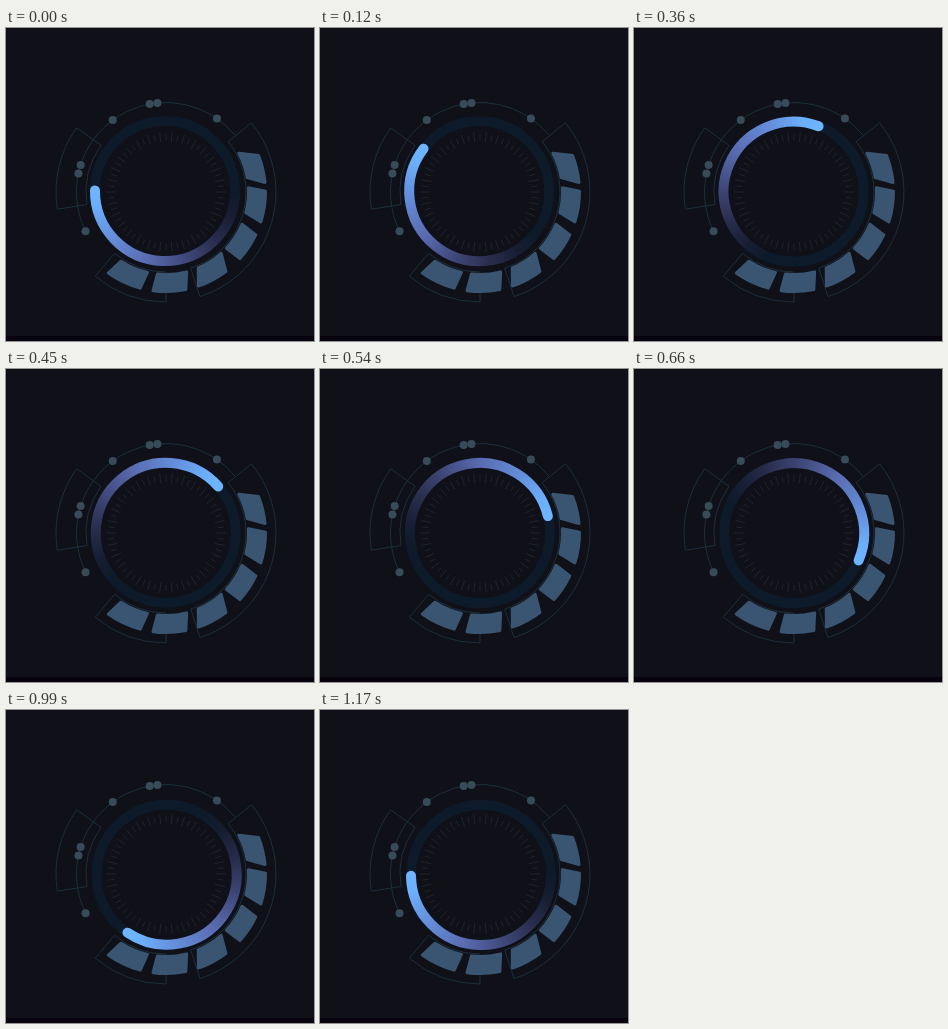
An HTML page with a canvas for the animation above (1230 ms loop, 308 by 313 pixels).

```html
<!DOCTYPE html>
<html>
<head>
<meta charset="utf-8">
<title>Dial loader</title>
<style>
html, body { margin: 0; width: 100%; height: 100%; overflow: hidden; background: #0f1018; }
canvas { display: block; }
</style>
</head>
<body>
<canvas id="stage" width="308" height="313"></canvas>
<script>
const ctx = document.getElementById('stage').getContext('2d');
const CX = 160, CY = 164, LOOP = 1230, STEP = 30, STEPS = 39;
const rad = deg => deg * Math.PI / 180;
const polar = (r, deg) => [CX + r * Math.cos(rad(deg)), CY + r * Math.sin(rad(deg))];

// Start and end angles of the outlined sectors
const sectors = [[-39, 72], [90, 130], [171, 215.7]];
// Inner start/end and outer start/end angles of the solid blocks
const blocks = [
  [-28, -10, -21.5, -5.5], [-3, 14.5, -0.5, 17.5], [23, 43, 25.5, 42],
  [48, 67, 53, 71], [75.5, 96, 78.5, 97.5], [103, 123, 105, 125.5]
];
const dots = [154, 192, 197.5, 233.5, 259.5, 264.5, 304.7];
// Trail colours by degrees behind the head
const trail = [
  [180, '#0d1a29'], [160, '#171e33'], [138, '#272b4a'], [110, '#3d4575'],
  [75, '#5a6cb2'], [40, '#648fdc'], [12, '#6cb0fc'], [0, '#6eb4ff']
];

function sector(r0, r1, [i0, i1, o0 = i0, o1 = i1]) {
  ctx.beginPath();
  ctx.arc(CX, CY, r0, rad(i0), rad(i1));
  ctx.arc(CX, CY, r1, rad(o1), rad(o0), true);
  ctx.closePath();
}

function drawFrame() {
  ctx.fillStyle = '#0f1018';
  ctx.fillRect(0, 0, 308, 313);
  ctx.fillStyle = '#07020d';
  ctx.fillRect(0, 308, 308, 5);

  ctx.lineWidth = 1;
  ctx.strokeStyle = '#1c303b';
  for (const s of sectors) {
    sector(80, 110, s);
    ctx.stroke();
  }
  ctx.beginPath();
  ctx.arc(CX, CY, 89.5, rad(154), rad(321));
  ctx.stroke();

  ctx.fillStyle = '#374c58';
  for (const a of dots) {
    ctx.beginPath();
    ctx.arc(...polar(89.5, a), 4, 0, 7);
    ctx.fill();
  }

  ctx.fillStyle = ctx.strokeStyle = '#3a5572';
  ctx.lineWidth = 3;
  ctx.lineJoin = 'round';
  for (const b of blocks) {
    sector(82.5, 99.5, b);
    ctx.fill();
    ctx.stroke();
  }

  ctx.lineWidth = 1;
  ctx.strokeStyle = '#20252b';
  ctx.beginPath();
  for (let i = 0; i < 60; i++) {
    ctx.moveTo(...polar(i % 2 ? 52 : 50, i * 6));
    ctx.lineTo(...polar(i % 2 ? 58 : 60, i * 6));
  }
  ctx.stroke();
}

function drawRing(p) {
  // The ring drifts slightly as its head goes round
  const x = 159 + 2 * p, y = 163 + 2 * p, head = 180.5 + 358.8 * p;
  ctx.lineWidth = 10;
  ctx.strokeStyle = '#0d1a29';
  ctx.beginPath();
  ctx.arc(x, y, 70, 0, 7);
  ctx.stroke();

  const fade = ctx.createConicGradient(rad(head - 180), x, y);
  for (const [behind, colour] of trail) fade.addColorStop((180 - behind) / 360, colour);
  fade.addColorStop(0.75, '#6eb4ff');
  fade.addColorStop(0.75, '#0d1a29');
  ctx.strokeStyle = fade;
  ctx.lineCap = 'round';
  ctx.beginPath();
  ctx.arc(x, y, 70, rad(head - 178), rad(head));
  ctx.stroke();
  ctx.lineCap = 'butt';
}

const start = performance.now();
function tick() {
  const t = (performance.now() - start) % LOOP;
  drawFrame();
  drawRing(Math.min(Math.floor(t / STEP), STEPS) / STEPS);
  requestAnimationFrame(tick);
}
tick();
</script>
</body>
</html>
```
